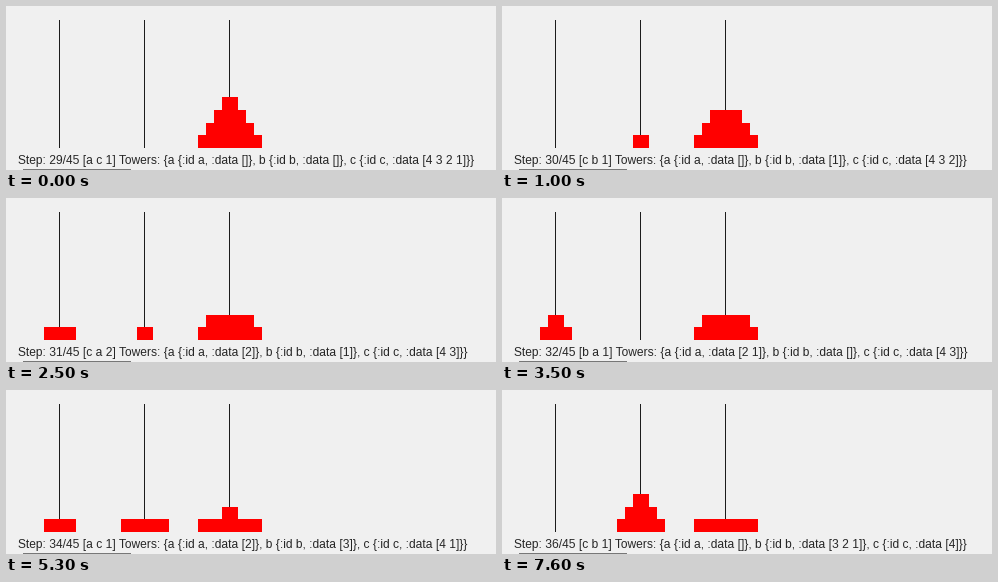
A matplotlib script for the animation above (8 s loop, 490 by 164 pixels).

```python
import matplotlib.pyplot as plt
from matplotlib.animation import FuncAnimation
from matplotlib.patches import FancyBboxPatch, Rectangle

W, H, DPI = 490, 164, 100
INTERVAL, FRAMES = 100, 80
POLES = {"a": 53.5, "b": 138.5, "c": 223.5}
BASE, DISC_W, DISC_H = 142, 16, 12.65
FIRST, TOTAL = 29, 45
MOVES = ["a c 1", "c b 1", "c a 2", "b a 1", "c b 3", "a c 1", "a b 2", "c b 1"]
STARTS = [0, 1000, 2000, 3100, 4100, 5100, 6200, 7100]


def build_states():
    towers = {"a": [], "b": [], "c": [4, 3, 2, 1]}
    states = [{k: list(v) for k, v in towers.items()}]
    for move in MOVES[1:]:
        src, dst, _ = move.split()
        towers[dst].append(towers[src].pop())
        states.append({k: list(v) for k, v in towers.items()})
    return states


def describe(step, towers):
    parts = [f"{k} {{:id {k}, :data [{' '.join(map(str, v))}]}}"
             for k, v in towers.items()]
    return (f"Step: {FIRST + step}/{TOTAL} [{MOVES[step]}] "
            f"Towers: {{{', '.join(parts)}}}")


STATES = build_states()

fig = plt.figure(figsize=(W / DPI, H / DPI), dpi=DPI, facecolor="#f0f0f0")
ax = fig.add_axes([0, 0, 1, 1])
ax.set(xlim=(0, W), ylim=(H, 0))
ax.axis("off")

for x in POLES.values():
    ax.add_patch(Rectangle((x - 0.5, 14), 1, BASE - 14, fc="#1c1c1c", lw=0))

# Top edge of the control cut off by the bottom border
ax.add_patch(FancyBboxPatch((18, 165.5), 105, 20, lw=0, fc="#6e6e6e",
                            boxstyle="round,pad=0,rounding_size=3"))
ax.add_patch(Rectangle((17, 163), 108, 1, fc="#777777", lw=0))

discs = {n: ax.add_patch(Rectangle((0, 0), DISC_W * n, DISC_H, fc="#ff0000",
                                   lw=0, zorder=3))
         for n in range(1, 5)}
label = ax.text(12, 158, "", fontsize=12 * 72 / DPI, color="#262626",
                family="Liberation Sans", va="baseline")


def draw(frame):
    step = sum(start <= frame * INTERVAL for start in STARTS) - 1
    towers = STATES[step]
    for name, stack in towers.items():
        for level, n in enumerate(stack, 1):
            discs[n].set_xy((POLES[name] - DISC_W * n / 2,
                             BASE - DISC_H * level))
    label.set_text(describe(step, towers))
    return [*discs.values(), label]


anim = FuncAnimation(fig, draw, frames=FRAMES, interval=INTERVAL,
                     repeat=True, repeat_delay=0, blit=False)
plt.show()
```
